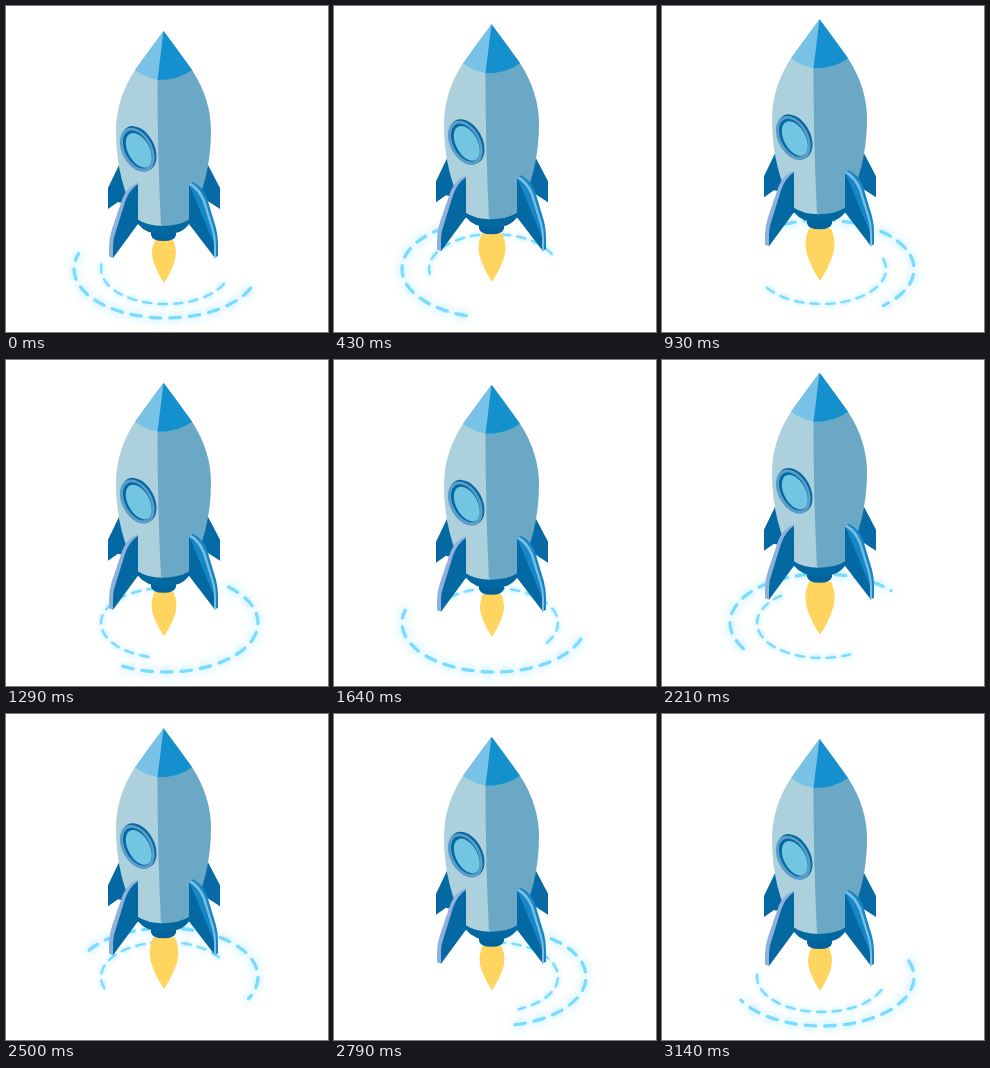
These frames come from a looping animation (322 px wide and 326 px high, 3210 ms). An HTML page with a canvas:

```html
<!DOCTYPE html>
<html lang="en">
<head>
<meta charset="utf-8">
<title>Rocket</title>
<style>
html, body { margin: 0; width: 100%; height: 100%; overflow: hidden; background: #fff; }
canvas { display: block; }
</style>
</head>
<body>
<canvas id="stage" width="322" height="326"></canvas>
<script>
const ctx = document.getElementById('stage').getContext('2d');
const LOOP = 3210, STEP = LOOP / 45;
const RAD = Math.PI / 180;

// Outer trail: time, tail angle, head angle
const TRAIL = [
  [0, 23, 198], [430, 108, 236], [930, 247, 409], [1640, 379, 555],
  [1930, 445, 612], [2500, 574, 747], [3140, 701, 872]
];

const shape = (color, d) => ({ color, path: new Path2D(d) });

const hull = [
  // rear fins
  shape('#0468a2', 'M113 159L102 182V203L112 196L128 200V170Z'),
  shape('#0769a5', 'M202 159L214 182V203L200 194L186 200V170Z'),
  // nozzle and base
  shape('#02629b', 'M145 224H170V229Q169 235 157.5 235Q146 235 145 229Z'),
  shape('#02689f', 'M130 212L132 218Q140 228.500 157.5 228.500Q176 228.500 183 218L186 212Z'),
  // body
  shape('#acd1dc', 'M157.5 25Q144 43 129 64C116 84 110 104 110 125C110 160 118 188 131 213Q141 220 157 220L160 100Z'),
  shape('#6ba8c6', 'M157.5 25Q171 43 186 64C199 84 205 104 205 125C205 158 197 188 184 213Q174 220 155 220Q151.500 150 151.500 74Z'),
  // nose
  shape('#78c2e8', 'M157.5 25Q144 43 129 64Q139 72 153 74Z'),
  shape('#1490cf', 'M157.5 25Q171 43 186 64Q173 74 151.500 74Z'),
  // front fins
  shape('#0468a2', 'M132 177V218L107 252L105 240L112 206L124 183Z'),
  shape('#8fb0dc', 'M132 176.500Q122 180 117 191L106 223Q103 232 103 241V250.500L107 252V240Q107 233 110 225L119 196Q123 184 132 178Z'),
  shape('#0468a2', 'M183 178V218L209 252L210 228L200 196Z'),
  shape('#1487c6', 'M183 178L187 176Q197 181 201 192L210 222Q212 230 212 238V250L208 252V238Z'),
  shape('#7dbde4', 'M183 178L185 177Q194 182 199 194L208 224Q210 231 210 239V251L208 252V239Q208 232 206 225L197 196Q192 184 183 179Z')
];

const flame = new Path2D('M-9 0H9Q15 13 9 26Q5 36 0 43Q-5 36 -9 26Q-15 13 -9 0Z');

function oval(color, x, y, rx, ry) {
  ctx.fillStyle = color;
  ctx.beginPath();
  ctx.ellipse(x, y, rx, ry, -28 * RAD, 0, 2 * Math.PI);
  ctx.fill();
}

function trail(cx, cy, rx, ry, tail, head, width, dash, glow) {
  ctx.save();
  ctx.strokeStyle = '#7bdbff';
  ctx.lineWidth = width;
  ctx.lineCap = 'round';
  ctx.setLineDash(dash);
  ctx.shadowColor = '#7bdbff';
  ctx.shadowBlur = glow;
  ctx.beginPath();
  ctx.ellipse(cx, cy, rx, ry, 0, tail * RAD, head * RAD);
  ctx.stroke();
  ctx.restore();
}

function outerAngles(t) {
  const i = Math.max(1, TRAIL.findIndex(k => k[0] >= t));
  const a = TRAIL[i - 1], b = TRAIL[i];
  const u = Math.min(1, (t - a[0]) / (b[0] - a[0]));
  return [1, 2].map(n => a[n] + (b[n] - a[n]) * u);
}

// 1 at the top of the hover, 0 at rest
function lift(t) {
  const u = Math.min(1, Math.abs(t - (t < 1535 ? 785 : 2285)) / 750);
  return u < 0.5 ? 1 - (2 * u) ** 2.5 / 2 : (2 - 2 * u) ** 2.5 / 2;
}

function draw(t) {
  ctx.clearRect(0, 0, 322, 326);
  const [tail, head] = outerAngles(Math.min(t, 3140));
  trail(160, 263, 92, 49, tail, head, 3.3, [10.5, 9], 10);
  const spin = 25 + 0.343 * Math.min(t, 3149);
  trail(159.5, 263, 64.5, 35, spin, spin + 168, 2.3, [8.5, 7], 5);

  const up = lift(t);
  ctx.save();
  ctx.translate(0, -12.3 * up);

  ctx.save();
  ctx.translate(158, 234);
  ctx.scale(1 + 0.23 * up, 1 + 0.23 * up);
  ctx.fillStyle = '#ffd55f';
  ctx.fill(flame);
  ctx.restore();

  for (const { color, path } of hull) {
    ctx.fillStyle = color;
    ctx.fill(path);
  }
  oval('#0468a2', 132.800, 142.500, 15.5, 24);
  oval('#5b9dc8', 131.300, 143.800, 15.2, 23.7);
  oval('#0468a2', 131.500, 143.500, 12.300, 20.500);
  oval('#72c6e2', 132.800, 144.300, 10.800, 18.800);
  ctx.restore();
}

function tick() {
  const t = performance.now() % LOOP;
  draw(Math.floor((t + 2) / STEP) % 45 * STEP);
  requestAnimationFrame(tick);
}
tick();
</script>
</body>
</html>
```
